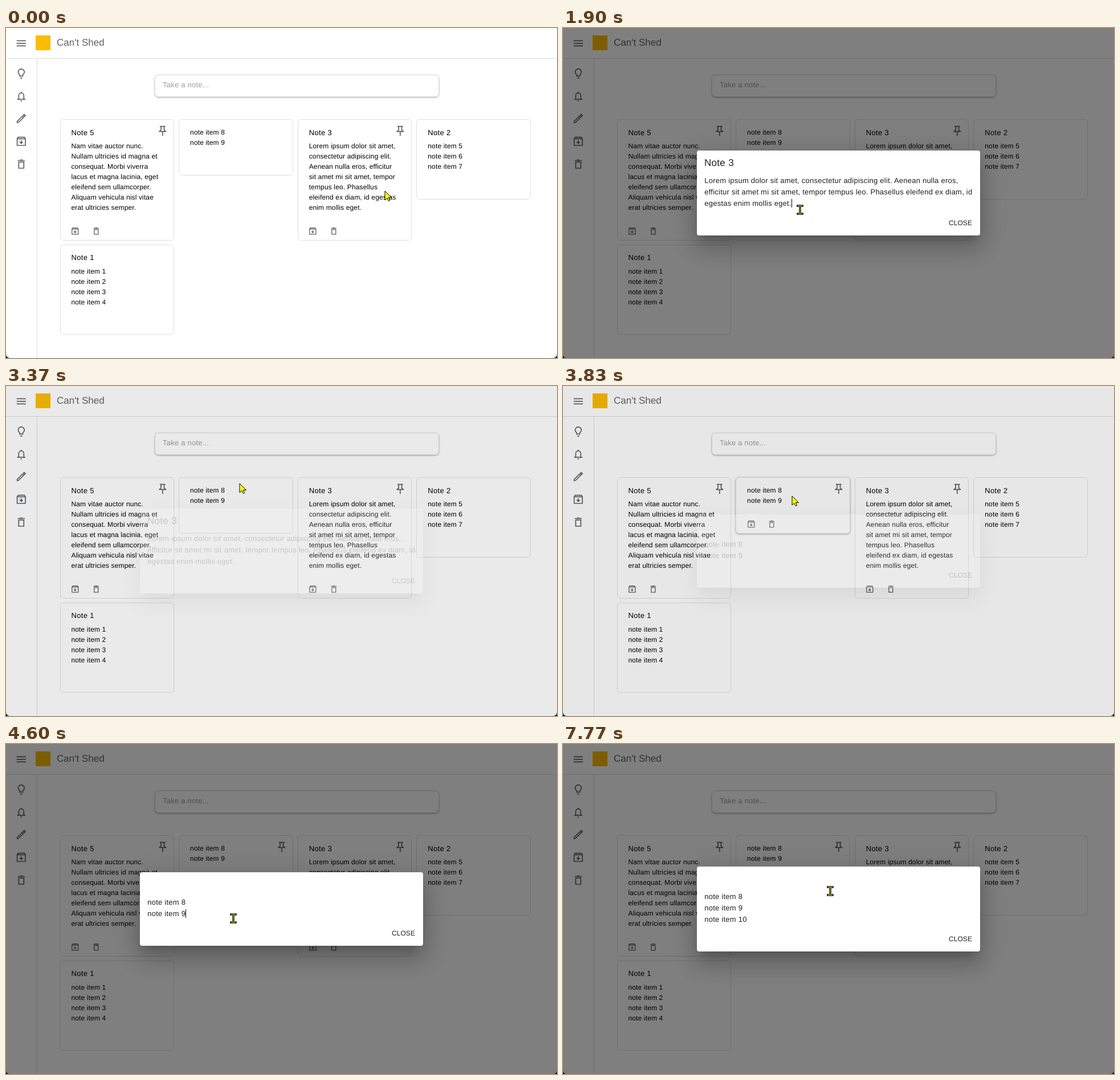
These frames come from a looping animation (967 px wide and 579 px high, 8 s). An HTML page:

```html
<!DOCTYPE html>
<html lang="en">
<head>
<meta charset="utf-8">
<title>Notes</title>
<style>
html, body { margin: 0; width: 100%; height: 100%; overflow: hidden; background: #1c1c1c; }
body { font-family: Arial, "Liberation Sans", sans-serif; text-rendering: geometricPrecision; }
div, svg { position: absolute; }
#app { inset: 0; overflow: hidden; background: #fff; border-radius: 0 0 7px 7px; }
.text { white-space: pre; }
.icon { overflow: visible; fill: none; stroke: #5f6368; stroke-width: 1.9; }
.head { left: 0; right: 0; top: 0; height: 53px; border-bottom: 1px solid #dadce0; }
.side { left: 0; top: 54px; bottom: 0; width: 54px; border-right: 1px solid #dadce0; }
.logo { left: 52px; top: 13px; width: 26px; height: 26px; background: #fbbc04; }
.brand { left: 89px; top: 16px; font-size: 17px; line-height: 19px; color: #5f6368; }
.entry { left: 261px; top: 82px; width: 497px; height: 37px; border: 1px solid #e0e0e0; border-radius: 7px;
  box-shadow: 0 1px 2px rgba(60,64,67,.3), 0 1px 3px 1px rgba(60,64,67,.12); }
.hint { left: 275px; top: 92px; font-size: 13px; line-height: 15px; letter-spacing: .232px; color: #9e9e9e; }
.card { box-sizing: border-box; width: 200.4px; border: 1px solid #e0e0e0; border-radius: 6px; background: #fff; }
.card .title { left: 18.9px; top: 14.5px; font-size: 13px; line-height: 16px; letter-spacing: .35px; color: #000; }
.card .body { left: 18.9px; font-size: 12px; line-height: 17.9px; letter-spacing: .14px; color: #000; }
.shade { inset: -1px; border-radius: 6px; box-shadow: 0 1px 2px rgba(60,64,67,.3), 0 1px 3px 1px rgba(60,64,67,.2); }
#backdrop { inset: 0; background: rgba(0,0,0,.5); }
#dialog { left: 235px; width: 497px; border-radius: 4px; background: #fff; color: #212121;
  box-shadow: 0 11px 15px -7px rgba(0,0,0,.2), 0 24px 38px 3px rgba(0,0,0,.14), 0 9px 46px 8px rgba(0,0,0,.12); }
#dialog .title { left: 13px; top: 12px; font-size: 17px; line-height: 19px; letter-spacing: .3px; }
#dialog .body { left: 13.3px; top: 42.5px; font-size: 13px; line-height: 20px; letter-spacing: .232px; }
#dialog .close { left: 442px; bottom: 15px; font-size: 12px; line-height: 14px; letter-spacing: .05px; }
.caret { display: inline-block; width: 1px; height: 15px; margin-right: -1px; vertical-align: text-top; background: #000; }
.title .caret { height: 19px; }
.cursor { left: 0; top: 0; width: 1px; height: 1px; overflow: visible; }
</style>
</head>
<body>
<div id="app"></div>
<script>
const SVG = 'http://www.w3.org/2000/svg';
const ICONS = {
  menu: 'M3 7h18M3 12h18M3 17h18',
  bulb: 'M9 17v-2.7A6 6 0 1 1 15 14.3V17zM10 21h4',
  bell: 'M7 18v-7a5 5.5 0 0 1 10 0v7M4 18h16M12 5V3M10.7 20.9h2.6',
  pencil: 'M4 20v-2.3L14 7.6 16.4 10 6.3 20zM15.8 5.8l2-1.8 2.3 2.3-2 2z',
  archive: 'M4 7v13h16V7zM4 7l2-3h12l2 3M12 10v5M9 13.2l3 3 3-3',
  trash: 'M7 8v12h10V8zM5 5h14M9.5 4h5',
  pin: 'M9 3v6q0 3-4 4h14q-4-1-4-4V3M6.5 3h11M12 13v8.5'
};
const LOREM = 'Lorem ipsum dolor sit amet, consectetur adipiscing elit. Aenean nulla eros,\n' +
  'efficitur sit amet mi sit amet, tempor tempus leo. Phasellus eleifend ex diam, id\negestas enim mollis eget.';
const ITEMS = 'note item 8\nnote item 9';

const app = document.getElementById('app');

function add(parent, cls, text) {
  const el = document.createElement('div');
  el.className = cls;
  if (text) el.textContent = text;
  parent.appendChild(el);
  return el;
}

function svg(parent, cls, markup) {
  const el = document.createElementNS(SVG, 'svg');
  el.setAttribute('class', cls);
  el.innerHTML = markup;
  parent.appendChild(el);
  return el;
}

// icon centred on x, y
function icon(parent, name, x, y, size = 21.6) {
  const el = svg(parent, 'icon', `<path d="${ICONS[name]}"/>`);
  el.setAttribute('viewBox', '0 0 24 24');
  el.style.cssText = `left:${x - size / 2}px;top:${y - size / 2}px;width:${size}px;height:${size}px`;
  return el;
}

function card(col, y, h, title, body, tools) {
  const el = add(app, 'card');
  el.style.cssText = `left:${94.6 + 208.6 * col}px;top:${y}px;height:${h}px`;
  const shade = add(el, 'shade');
  shade.style.opacity = 0;
  if (title) add(el, 'text title', title);
  add(el, 'text body', body).style.top = (title ? 38.4 : 14.4) + 'px';
  const icons = tools ? [
    icon(el, 'pin', 179.4, 20), icon(el, 'archive', 26, h - 18, 16.6), icon(el, 'trash', 62.6, h - 18, 16.6)
  ] : [];
  return { shade, icons };
}

add(app, 'head');
add(app, 'side');
icon(app, 'menu', 26.5, 26.5);
add(app, 'logo');
add(app, 'text brand', "Can't Shed");
['bulb', 'bell', 'pencil', 'archive', 'trash'].forEach((name, i) => icon(app, name, 26.5, 79.5 + 39.8 * i));
add(app, 'entry');
add(app, 'text hint', 'Take a note...');

card(0, 160, 213, 'Note 5', 'Nam vitae auctor nunc.\nNullam ultricies id magna et\nconsequat. Morbi viverra\n' +
  'lacus et magna lacinia, eget\neleifend sem ullamcorper.\nAliquam vehicula nisl vitae\nerat ultricies semper.', true);
const short = card(1, 160, 99, '', ITEMS, true);
const long = card(2, 160, 213, 'Note 3', 'Lorem ipsum dolor sit amet,\nconsectetur adipiscing elit.\n' +
  'Aenean nulla eros, efficitur\nsit amet mi sit amet, tempor\ntempus leo. Phasellus\n' +
  'eleifend ex diam, id egestas\nenim mollis eget.', true);
card(3, 160, 141, 'Note 2', 'note item 5\nnote item 6\nnote item 7');
card(0, 379.6, 158.6, 'Note 1', 'note item 1\nnote item 2\nnote item 3\nnote item 4');

const backdrop = add(app, '');
backdrop.id = 'backdrop';
const dialog = add(app, '');
dialog.id = 'dialog';

function field(cls) {
  const box = add(dialog, 'text ' + cls);
  const text = box.appendChild(document.createElement('span'));
  const caret = box.appendChild(document.createElement('i'));
  caret.className = 'caret';
  return {
    set(value, on) {
      if (text.textContent !== value) text.textContent = value;
      caret.style.visibility = on ? 'visible' : 'hidden';
    }
  };
}
const titleField = field('title'), bodyField = field('body');
add(dialog, 'text close', 'CLOSE');

const arrow = svg(app, 'cursor',
  '<path d="M0 0V16L3.8 12.6 6.4 17.6 8.8 16.4 6.4 11.6H11.6Z" fill="#ff0" stroke="#000" stroke-linejoin="round"/>');
const BEAM = 'M-4-7H4M-4 7H4M0-7V7';
const beam = svg(app, 'cursor',
  `<path d="${BEAM}" stroke="#111" stroke-width="3.6" stroke-linecap="square"/><path d="${BEAM}" stroke="#a39b12" stroke-width="1.5"/>`);

const LOOP = 8000, OPEN1 = 500, CLOSE1 = 3263, HOVER2 = 3440, OPEN2 = 3780, ENTER = 5330;
const KEYS = [5830, 5930, 6030, 6170, 6400, 6500, 6600, 6720, 6830, 6930, 7100, 7230];
const PATH = [
  [30, 665, 286], [400, 662, 263], [600, 661, 259], [870, 661, 257], [1370, 420, 331], [1600, 420, 331],
  [1900, 416, 319], [2070, 416, 319], [2530, 415, 254], [2900, 415, 254], [3180, 410, 171], [3450, 410, 171],
  [3750, 402, 193], [4000, 402, 193], [4530, 399.5, 304], [4600, 399, 306], [4800, 399, 306], [4800, 469, 258]
];

const clamp = v => Math.max(0, Math.min(1, v));
const within = (t, a, b) => t >= a && t < b;
const ramp = (t, start, length) => clamp((t - start) / length);

// cubic-bezier(.4, 0, .2, 1)
function ease(x) {
  if (x <= 0 || x >= 1) return clamp(x);
  let lo = 0, hi = 1, s;
  for (let i = 0; i < 24; i++) {
    s = (lo + hi) / 2;
    const bx = 1.2 * s * (1 - s) ** 2 + .6 * s * s * (1 - s) + s ** 3;
    if (bx < x) lo = s; else hi = s;
  }
  return s * s * (3 - 2 * s);
}

function pointer(t) {
  const i = PATH.findIndex(k => k[0] > t);
  if (i <= 0) return PATH[i ? PATH.length - 1 : 0].slice(1);
  const a = PATH[i - 1], b = PATH[i];
  const u = (t - a[0]) / (b[0] - a[0]), s = u * u * (3 - 2 * u);
  return [a[1] + (b[1] - a[1]) * s, a[2] + (b[2] - a[2]) * s];
}

function render(t) {
  const second = t >= 3600;
  const tall = !second || t >= ENTER;
  const fade = second ? ease(ramp(t, OPEN2, 225))
    : t < CLOSE1 ? ease(ramp(t, OPEN1, 225)) : 1 - ease(ramp(t, CLOSE1, 195));
  const top = tall ? 215 : 225, height = tall ? 149 : 129;

  backdrop.style.opacity = dialog.style.opacity = fade;
  backdrop.style.display = dialog.style.display = fade ? 'block' : 'none';
  dialog.style.top = top + 'px';
  dialog.style.height = height + 'px';

  if (second) {
    const typed = 'note item 10'.slice(0, KEYS.filter(k => k <= t).length);
    titleField.set('', false);
    bodyField.set(ITEMS + (t >= ENTER ? '\n' + typed : ''), within(t, 4600, 5130) || within(t, ENTER, 7760));
  } else {
    titleField.set('Note 3', within(t, 2730, 3260));
    bodyField.set(LOREM, within(t, 1900, 2430));
  }

  long.shade.style.opacity = ramp(t, 30, 200) * (1 - ramp(t, 650, 200));
  short.shade.style.opacity = ramp(t, HOVER2, 200) * (1 - ramp(t, 3900, 200));
  short.icons.forEach(el => el.style.opacity = ramp(t, HOVER2, 200));

  const [x, y] = pointer(t);
  const open = within(t, OPEN1, CLOSE1) || t >= OPEN2;
  const editing = open && y > top && y < top + height;
  arrow.style.display = editing ? 'none' : 'block';
  beam.style.display = editing ? 'block' : 'none';
  (editing ? beam : arrow).style.transform = `translate(${x}px,${y}px)`;
}

const start = performance.now();
function tick() {
  render((performance.now() - start) % LOOP);
  requestAnimationFrame(tick);
}
tick();
</script>
</body>
</html>
```
